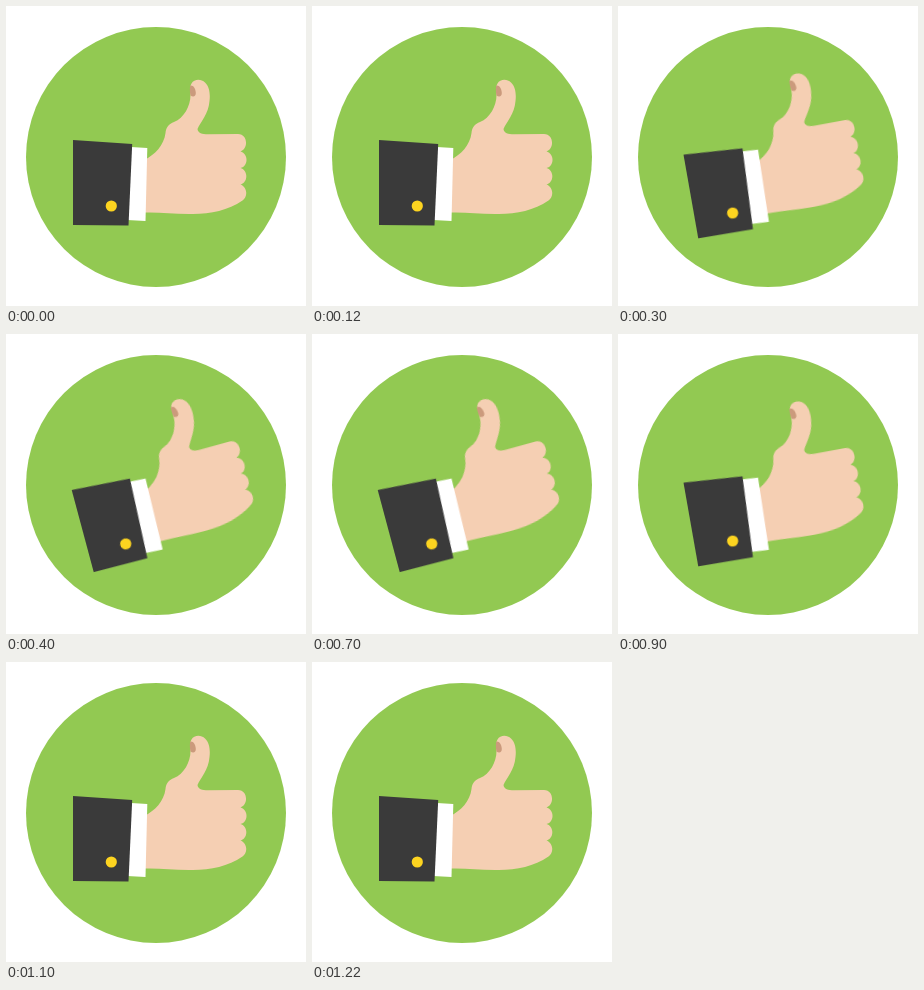
Recreate the animation shown at these times as an HTML page. Size 300 by 300 pixels, loop 1300 ms.

```html
<!DOCTYPE html>
<html lang="en">
<head>
<meta charset="utf-8">
<title>Thumbs up</title>
<style>
  html, body { margin: 0; width: 100%; height: 100%; overflow: hidden; background: #fff; }
  svg { display: block; width: 100%; height: 100%; }
  #arm { transform-origin: 150px 150px; }
</style>
</head>
<body>
<svg viewBox="0 0 300 300">
  <circle cx="150" cy="151" r="130" fill="#92c952"/>
  <g id="arm">
    <path fill="#f5cfb3" d="M138 154 C149 149 158 139 159.5 127 C160 121 163 118 168 116
      C178 112 184.5 100 184.5 89 C184 84 184 80 185.5 77.5 C188 73 195 72.5 199 76.5
      C203 80 204.5 87 203.5 95 C202.5 108 194.5 116 191.5 123 C192 127 196 128.3 202 128.3
      L232 128 C242 128 242.500 143 234.500 145.500 C242.500 148 242.500 160 234.500 162
      C242.500 164.500 242 176.500 234.500 178.500 C241.500 181 242 191 236.500 194.500
      C221 205 203 208.500 183 208 C166 207.500 152 206 138 206.500 Z"/>
    <path fill="#cb9a7c" d="M184.300 79.500 C187.500 79 189.500 82.500 189.800 87 C190 90.500 187 91.500 184.500 89.500 C183.800 86 183.600 82.500 184.300 79.500 Z"/>
    <path fill="#fff" d="M125 141 L141.300 142 L139.500 215 L121 214 Z"/>
    <path fill="#3a3a3a" d="M67 134 L126.200 138 L122.500 219.500 L67 219 Z"/>
    <circle cx="105.300" cy="200" r="5.600" fill="#fdd420"/>
  </g>
</svg>
<script>
  const LOOP = 1300;
  // [start in ms, tilt in degrees]
  const steps = [[0, 0], [200, -5], [300, -10], [400, -15], [900, -10], [1000, -5], [1100, 0], [LOOP, 0]];

  document.getElementById('arm').animate(
    steps.map(([time, tilt]) => ({
      offset: time / LOOP,
      transform: `rotate(${tilt}deg)`,
      easing: 'step-end'
    })),
    { duration: LOOP, iterations: Infinity }
  );
</script>
</body>
</html>
```
